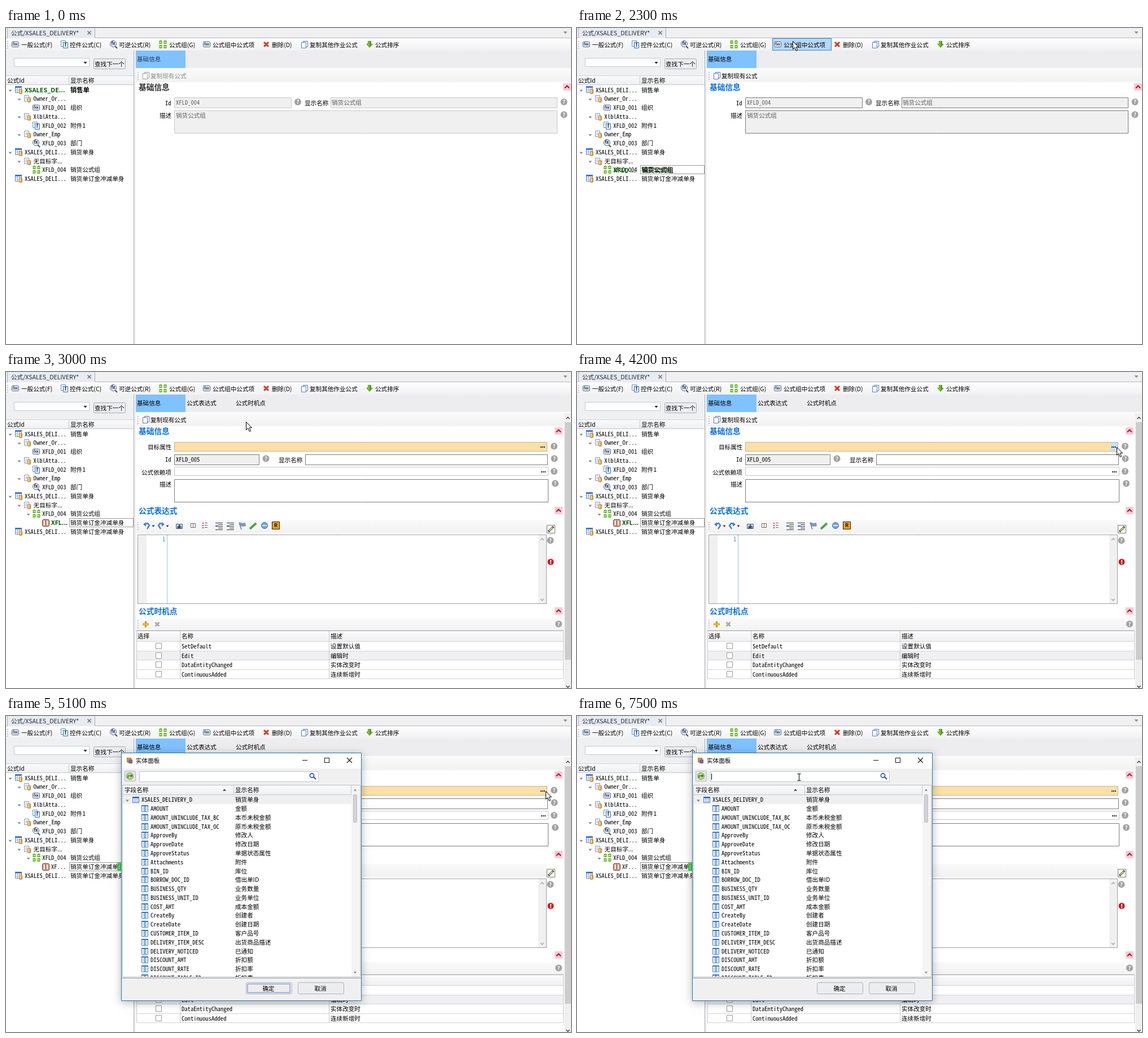
These frames come from a looping animation (1001 px wide and 560 px high, 8000 ms). An HTML page with a canvas:

```html
<!DOCTYPE html>
<html lang="zh-CN">
<head>
<meta charset="utf-8">
<title>公式</title>
<style>
html, body { margin: 0; width: 100%; height: 100%; overflow: hidden; background: #fff; }
canvas { display: block; }
</style>
</head>
<body>
<canvas id="stage" width="1001" height="560"></canvas>
<script>
const LOOP = 8000, STEP = 100;
const stage = document.getElementById('stage');
const screen2d = stage.getContext('2d');
const layer = document.createElement('canvas');
layer.width = stage.width;
layer.height = stage.height;
const layer2d = layer.getContext('2d');
let g = screen2d;

const SANS = '"Noto Sans CJK SC", "Noto Sans CJK", sans-serif';
const MONO = '"Noto Sans Mono CJK SC", "Liberation Mono", monospace';
g.font = `100px ${MONO}`;
const monoSize = 530 / g.measureText('M').width;

// Drawing helpers
function text(str, x, y, color = '#000', size = 10.6, bold = false, align = 'left') {
  g.font = `${bold ? 'bold ' : ''}${size}px ${SANS}`;
  g.textAlign = align;
  g.textBaseline = 'middle';
  g.fillStyle = color;
  g.fillText(str, x, y);
}
function mono(str, x, y, color = '#000') {
  g.font = `${monoSize}px ${MONO}`;
  g.textAlign = 'left';
  g.textBaseline = 'middle';
  g.fillStyle = color;
  g.fillText(str, x, y);
}
const label = (str, x, y, color) => /^[\x20-\x7e]+$/.test(str) ? mono(str, x, y, color) : text(str, x, y, color);
function fill(x, y, w, h, color) {
  g.fillStyle = color;
  g.fillRect(x, y, w, h);
}
function box(x, y, w, h, color, border, radius = 0) {
  g.beginPath();
  g.roundRect(x + .5, y + .5, w - 1, h - 1, radius);
  g.fillStyle = color;
  g.fill();
  g.lineWidth = 1;
  g.strokeStyle = border;
  g.stroke();
}
function trace(pts) {
  g.beginPath();
  pts.forEach(([x, y]) => g.lineTo(x, y));
}
function line(pts, color, width = 1) {
  trace(pts);
  g.strokeStyle = color;
  g.lineWidth = width;
  g.stroke();
}
function poly(pts, color) {
  trace(pts);
  g.closePath();
  g.fillStyle = color;
  g.fill();
}
function disc(x, y, r, color, border) {
  g.beginPath();
  g.arc(x, y, r, 0, 7);
  g.fillStyle = color;
  g.fill();
  if (border) {
    g.strokeStyle = border;
    g.lineWidth = 1;
    g.stroke();
  }
}
function fade(x, y, w, h, from, to) {
  const grad = g.createLinearGradient(0, y, 0, y + h);
  grad.addColorStop(0, from);
  grad.addColorStop(1, to);
  fill(x, y, w, h, grad);
}
const hline = (x, y, w, color) => fill(x, y, w, 1, color);
const vline = (x, y, h, color) => fill(x, y, 1, h, color);
const down = (x, y, r, color) => poly([[x - r, y - r / 2], [x + r, y - r / 2], [x, y + r / 2 + .5]], color);
function dotted(x, y, w, h, color = '#333') {
  g.setLineDash([1, 1]);
  g.strokeStyle = color;
  g.lineWidth = 1;
  g.strokeRect(x + .5, y + .5, w - 1, h - 1);
  g.setLineDash([]);
}
function cross(x, y, r, color, width) {
  line([[x - r, y - r], [x + r, y + r]], color, width);
  line([[x + r, y - r], [x - r, y + r]], color, width);
}
function grip(x, y) {
  for (let i = 0; i < 4; i++) fill(x, y + i * 4, 1.5, 1.5, '#a4a8ae');
}

// Icons: x is the left edge, y the vertical centre
const icons = {
  fx(x, y) {
    box(x, y - 5, 13, 10, '#eef4fc', '#44618c', 1);
    text('fxx', x + 6.5, y - .5, '#123', 6, true, 'center');
  },
  control(x, y) {
    box(x, y - 7, 9, 11, '#f4f8fd', '#6c93c0');
    hline(x + 2, y - 4, 5, '#a8bcd4');
    box(x + 4, y - 4, 9, 11, '#e6f0fc', '#3a6fb8');
    text('f', x + 8.5, y + 1, '#1c4c94', 9, true, 'center');
  },
  reverse(x, y) {
    line([[x + 9, y + 3], [x + 13, y + 7]], '#3d4d63', 2);
    disc(x + 6, y - 1, 5.5, '#e4eefa', '#50698c');
    text('fx', x + 6, y - 1.5, '#123', 7.5, true, 'center');
  },
  group(x, y) {
    for (const dx of [0, 8]) for (const dy of [-7, 1]) {
      fill(x + dx + 1, y + dy, 4, 6, '#58ac22');
      fill(x + dx, y + dy + 1, 6, 1.5, '#70c234');
      fill(x + dx, y + dy + 4, 6, 1.5, '#70c234');
      fill(x + dx + 2, y + dy + 2, 2, 2, '#d8f0b8');
    }
  },
  remove(x, y) { cross(x + 6, y, 4, '#d23a22', 3); },
  copy(x, y, gray) {
    const c = gray ? '#a0a0a0' : '#5679b6';
    box(x + 3, y - 6, 9, 11, '#fff', c);
    box(x, y - 4, 9, 11, '#fff', c);
  },
  sort(x, y) {
    poly([[x + 3, y - 6], [x + 9, y - 6], [x + 9, y - 1], [x + 12, y - 1], [x + 6, y + 6], [x, y - 1], [x + 3, y - 1]], '#4f9c1b');
    poly([[x + 4, y - 5], [x + 6, y - 5], [x + 6, y + 4], [x + 2, y], [x + 4, y]], '#8dcc3d');
  },
  table(x, y) {
    box(x, y - 7, 12, 12, '#fff', '#5a86c0');
    fill(x, y - 7, 12, 3, '#3f79c4');
    for (const d of [4, 8]) vline(x + d, y - 4, 8, '#9db8da');
    for (const d of [-2, 1]) hline(x + 1, y + d, 10, '#9db8da');
    icons.drum(x + 7, y);
  },
  drum(x, y) {
    box(x, y - 2, 6, 9, '#e6a94c', '#b8802e', 1);
    fill(x + 1, y - 1, 2, 6, '#fbd999');
  },
  entity(x, y) {
    box(x, y - 6, 9, 11, '#fafcff', '#8099b8');
    for (const d of [-3, -1, 1]) hline(x + 2, y + d, 5, '#a8bcd4');
    icons.drum(x + 6, y);
  },
  item(x, y) {
    box(x, y - 6, 13, 13, '#dcb0a0', '#6e2c20', 2);
    fill(x + 3, y - 3, 2, 7, '#f8e4dc');
    fill(x + 8, y - 3, 2, 7, '#f8e4dc');
    vline(x + 6, y - 4, 9, '#8a3c2c');
  },
  sheet(x, y) {
    box(x, y - 6, 12, 12, '#fff', '#4d7fc4');
    fill(x, y - 6, 12, 2, '#3a70ba');
    fill(x + 4, y - 4, 4, 9, '#8fb4e4');
    for (const d of [-2, 0, 2]) {
      hline(x + 1, y + d, 3, '#c4d6ee');
      hline(x + 8, y + d, 3, '#c4d6ee');
    }
  },
  grid(x, y) {
    box(x, y - 5, 12, 11, '#fff', '#4d7fc4');
    fill(x, y - 5, 12, 3, '#3a70ba');
    for (const d of [4, 8]) vline(x + d, y - 2, 7, '#8fb0dc');
    for (const d of [0, 3]) hline(x + 1, y + d, 10, '#8fb0dc');
  }
};
function help(x, y) {
  disc(x, y, 6, '#a2a2a2');
  text('?', x, y - .5, '#fff', 9.5, true, 'center');
}
function chevron(x, y, color, w = 4, width = 2) {
  line([[x - w, y + w / 2], [x, y - w / 2], [x + w, y + w / 2]], color, width);
}
function section(title, y, foldX, color = '#0a6fe0') {
  text(title, 235, y, color, 13.7, true);
  fill(foldX, y - 7, 14, 13, '#f8cbd4');
  chevron(foldX + 7, y - .5, '#b0122c');
}
function dots(x, y) {
  for (const d of [-4, -1, 2]) fill(x + d, y, 2, 2, '#222');
}

// Window chrome
const TOOLS = [
  ['fx', 10, 27, '一般公式(F)'], ['control', 97, 113, '控件公式(C)'], ['reverse', 184, 200, '可逆公式(R)'],
  ['group', 271, 289, '公式组(G)'], ['fx', 349, 366, '公式组中公式项'], ['remove', 455, 471, '删除(D)'],
  ['copy', 523, 538, '复制其他作业公式'], ['sort', 638, 654, '公式排序']
];
function chrome(hover) {
  fill(0, 0, 1001, 560, '#fff');
  fill(0, 0, 1001, 18, '#f0f0f2');
  hline(0, 17, 1001, '#b4b8be');
  fill(2, 0, 156, 18, '#e8ebf0');
  vline(2, 0, 18, '#a8aeb8');
  vline(157, 0, 18, '#a8aeb8');
  text('公式/XSALES_DELIVERY*', 9, 8.5, '#1e2a3c');
  cross(147.5, 8.5, 3, '#6a7078', 1.6);
  down(991, 8, 3.5, '#888');
  fade(0, 18, 1001, 22, '#fdfdfd', '#f1f2f4');
  grip(2, 23);
  if (hover) box(346, 18, 105, 22, '#b5d9f6', '#3b8ad0');
  for (const [icon, ix, tx, name] of TOOLS) {
    icons[icon](ix, 29);
    text(name, tx, 29.5);
  }
}

function leftPane() {
  fill(0, 40, 226, 44, '#eff0f2');
  box(14, 53, 134, 16, '#fff', '#c6c9ce');
  down(140.5, 61.5, 3, '#111');
  box(155, 54, 57, 19, '#ebedf1', '#a7abb3', 2);
  text('查找下一个', 157, 63.5);
  fade(0, 84, 226, 17, '#fbfbfc', '#eeeff1');
  hline(0, 84, 226, '#cfd2d6');
  hline(0, 100, 226, '#c4c7cc');
  vline(111, 85, 15, '#c4c7cc');
  text('公式Id', 2, 92.5);
  text('显示名称', 114, 92.5);
  fill(227, 40, 3, 520, '#f0f0f2');
  vline(226, 40, 520, '#a9adb3');
}

const TREE = [
  [0, 'table', 'XSALES_DELI...', '销售单'], [1, 'entity', 'Owner_Or...'], [2, 'fx', 'XFLD_001', '组织'],
  [1, 'entity', 'XlblAtta...'], [2, 'control', 'XFLD_002', '附件1'], [1, 'entity', 'Owner_Emp'],
  [2, 'reverse', 'XFLD_003', '部门'], [0, 'table', 'XSALES_DELI...', '销货单身'], [1, 'entity', '无目标字...'],
  [2, 'group', 'XFLD_004', '销货公式组']
];
const LAST = [0, 'table', 'XSALES_DELI...', '销货单订金冲减单身'];
const ADDED = [3, 'item', '', '销货单订金冲减单身'];

function tree(t, expanded) {
  const rows = expanded ? [...TREE, ADDED, LAST] : [...TREE, LAST];
  rows.forEach(([depth, icon, id, name], i) => {
    const y = 109.5 + i * 15.75, x = 16 + depth * 16;
    const opens = rows[i + 1] && rows[i + 1][0] > depth;
    if (opens) down(x - 8.5, y + 1.5, 3, '#888');
    icons[icon](Math.round(x - (depth === 2 ? 1 : 0)), Math.round(y));
    if (i === 0 && t < 900) {
      text('XSALES_DE...', 33, y + .5, '#005c00', 10.9, true);
      text(name, 114, y + .5, '#000', 11.3, true);
      return;
    }
    label(id, 33 + depth * 15.6, y);
    if (name) text(name, 114, y);
  });
  if (expanded) {
    if (t < 4400) text('XFL...', 80, 267, '#004f00', 10.6, true);
    else mono('XF...', 80, 267);
    dotted(112, 259, 114, 16);
  } else if (t >= 900) {
    text('XFLD ...', 65, 252, '#006400', 10.6, true);
    text('销货公式组', 115, 252, '#0a2a0a', 11.1, true);
    dotted(112, 243, 114, 16);
  }
}

function rightTop(active, tabs) {
  fill(230, 40, 771, 31, '#ededef');
  fill(230, 40, 88, 31, '#80c1ff');
  tabs.forEach((name, i) => text(name, [232, 320, 407][i], 55, active ? '#000' : '#263a50'));
  fade(230, 72, 771, 24, '#fafafa', '#f2f2f3');
  grip(233, 78);
  icons.copy(242, 84, !active);
  text('复制现有公式', 256, 84.5, active ? '#000' : '#888');
}

function groupForm(t) {
  const active = t >= 900, open = active && t < 2300;
  const border = active ? '#7c7c7c' : '#c8c8c8';
  const ink = open ? '#000' : '#606060';
  const paper = open ? '#fff' : '#f0f0f0';
  rightTop(active, ['基础信息']);
  section('基础信息', 105, 987, active ? undefined : '#333');
  mono('Id', 282, 132.5);
  box(298, 123, 208, 19, '#f0f0f0', border);
  mono('XFLD_004', 301, 132, ink);
  help(517, 131);
  text('显示名称', 529, 132.5);
  box(575, 123, 402, 19, paper, border);
  text('销货公式组', 577, 132, ink);
  help(988.5, 131);
  text('描述', 272, 155);
  box(298, 146, 679, 41, paper, border);
  text('销货公式组', 301, 154.5, ink);
  help(988.5, 153.5);
}

function editorTools() {
  fade(230, 262, 728, 23, '#fafafa', '#f2f2f3');
  grip(233, 266);
  for (const [x, s] of [[249, 1], [275, -1]]) {
    line([[x - 3 * s, 270], [x + 2 * s, 268], [x + 5 * s, 272], [x + s, 278]], '#4a7cc0', 2.4);
    poly([[x - 6 * s, 270], [x - s, 266], [x - s, 274]], '#4a7cc0');
    down(x + (s > 0 ? 12 : 11), 273, 2.5, '#222');
  }
  box(301, 269, 6, 9, '#c7d9ee', '#42628c');
  box(307, 269, 6, 9, '#c7d9ee', '#42628c');
  text('ab', 307, 274, '#123', 7, true, 'center');
  box(327, 268, 5, 8, '#fff', '#666');
  box(331, 268, 5, 8, '#fff', '#666');
  for (let i = 0; i < 3; i++) {
    fill(348, 267 + i * 4, 2, 2, '#c33');
    hline(352, 267 + i * 4, 5, '#666');
  }
  for (const x of [371, 391]) {
    for (let i = 0; i < 5; i++) hline(x + (i % 4 ? 5 : 0), 267 + i * 3, i % 4 ? 8 : 13, '#333');
    line([[x, 273], [x + 5, 273]], '#2b62b4', 2);
  }
  line([[413, 267], [417, 279]], '#777', 1.5);
  poly([[413, 266], [419, 268], [424, 267], [425, 273], [420, 274], [415, 273]], '#7c99be');
  line([[432, 278], [443, 268]], '#4aa545', 4);
  disc(458, 272, 5.5, '#72a6dc', '#3d72b0');
  line([[454, 272], [462, 272]], '#fff', 1.5);
  box(471, 265, 14, 14, '#f6a21c', '#222');
  text('R', 478, 272, '#111', 9, true, 'center');
  box(958, 271, 15, 15, '#fff', '#777');
  line([[961, 283], [970, 274]], '#444', 3.6);
  line([[962.5, 281.5], [968.5, 275.5]], '#f2d46a', 1.8);
}

const TIMINGS = [['SetDefault', '设置默认值'], ['Edit', '编辑时'], ['DataEntityChanged', '实体改变时'], ['ContinuousAdded', '连续新增时']];
function timingGrid() {
  fade(230, 436, 758, 22, '#fafafa', '#f2f2f3');
  grip(233, 440);
  line([[242, 447], [253, 447]], '#d99a1c', 3.5);
  line([[247.5, 441.5], [247.5, 452.5]], '#d99a1c', 3.5);
  line([[243, 447], [252, 447]], '#ffd75c', 1.2);
  cross(268, 447, 3.5, '#aaa', 3);
  help(979, 446.5);
  fade(231, 459, 757, 18, '#fbfbfc', '#f0f0f2');
  hline(231, 458, 757, '#9a9a9a');
  text('选择', 233, 468);
  text('名称', 311, 468);
  text('描述', 575, 468);
  TIMINGS.forEach(([id, name], i) => {
    const y = 486 + i * 16.5;
    if (i === 1) fill(231, 494, 757, 17, '#f0f0f3');
    box(265, Math.round(y - 6), 11, 11, '#fff', '#999');
    mono(id, 311, y);
    text(name, 575, y);
  });
  for (let i = 0; i < 5; i++) hline(231, Math.round(477 + i * 16.5), 757, '#d4d4d6');
  for (const x of [231, 308, 572, 987]) vline(x, 459, 85, '#c6c8cc');
}

function itemForm(t) {
  rightTop(true, ['基础信息', '公式表达式', '公式时机点']);
  section('基础信息', 105, 972);
  text('目标属性', 251, 133);
  box(298, 124, 661, 17, '#fce0a8', '#c4b490');
  if (t >= 4100 && t < 5100) fill(945, 125, 13, 15, '#c6e2fa');
  dots(951, 132);
  help(971, 131.5);
  mono('Id', 282, 155);
  box(298, 146, 151, 19, '#f0f0f0', '#7c7c7c');
  mono('XFLD_005', 301, 154.5);
  help(460.5, 153.5);
  text('显示名称', 483, 155.5);
  box(530, 146, 430, 19, '#fff', '#7c7c7c');
  help(971.5, 153.5);
  text('公式依赖项', 240, 177.5);
  box(298, 168, 663, 16, '#fff', '#c8c8c8');
  dots(952, 176);
  help(971, 176);
  text('描述', 272, 199);
  box(298, 190, 663, 41, '#fff', '#7c7c7c');
  help(973, 197.5);

  section('公式表达式', 246, 972);
  editorTools();
  box(233, 288, 725, 123, '#fff', '#a0a0a0');
  fill(234, 289, 15, 121, '#f0f0f0');
  mono('1', 277, 295.5, '#2b91af');
  g.setLineDash([1, 1]);
  line([[285.5, 289], [285.5, 410]], '#2b91af');
  g.setLineDash([]);
  fill(943, 289, 14, 121, '#f0f0f0');
  chevron(950, 296.5, '#aaa', 3, 1.5);
  line([[947, 402], [950, 405], [953, 402]], '#aaa', 1.5);
  help(964.5, 298.5);
  const blinkOff = t < 4700 && Math.floor(t / 250) % 2;
  if (!blinkOff) {
    disc(965, 336.5, 5.5, '#d8121a');
    fill(964, 333, 2, 4.5, '#fff');
    fill(964, 338.5, 2, 2, '#fff');
  }
  section('公式时机点', 424, 972);
  timingGrid();

  fill(989, 73, 12, 487, '#f0f0f0');
  fill(990, 89, 11, 421, '#cdcdcd');
  chevron(995.5, 81.5, '#444', 3, 1.5);
  line([[992.5, 556], [995.5, 559], [998.5, 556]], '#444', 1.5);
}

// Entity dialog
const FIELDS = `XSALES_DELIVERY_D 销货单身|AMOUNT 金额|AMOUNT_UNINCLUDE_TAX_BC 本币未税金额|AMOUNT_UNINCLUDE_TAX_OC 原币未税金额|ApproveBy 修改人|ApproveDate 修改日期|ApproveStatus 单据状态属性|Attachments 附件|BIN_ID 库位|BORROW_DOC_ID 借出单ID|BUSINESS_QTY 业务数量|BUSINESS_UNIT_ID 业务单位|COST_AMT 成本金额|CreateBy 创建者|CreateDate 创建日期|CUSTOMER_ITEM_ID 客户品号|DELIVERY_ITEM_DESC 出货商品描述|DELIVERY_NOTICED 已通知|DISCOUNT_AMT 折扣额|DISCOUNT_RATE 折扣率|DISCOUNT_TABLE_ID 折扣表`
  .split('|').map(row => row.split(' '));

function fieldList() {
  g.save();
  g.beginPath();
  g.rect(207, 140, 405, 322);
  g.clip();
  fill(207, 140, 405, 16, '#f0f0f1');
  FIELDS.forEach(([id, name], i) => {
    const y = 148.3 + i * 15.78, x = i ? 240 : 224;
    icons[i ? 'sheet' : 'grid'](x, Math.round(y));
    mono(id, x + 16, y);
    text(name, 406, y);
  });
  down(215, 150, 3, '#888');
  g.restore();
}

function button(name, x, focused) {
  box(x, 472, 82, 21, '#ededf0', '#adb1b8', 2);
  if (focused) {
    box(x + 2, 474, 77, 17, '#ededf0', '#86b4ea');
    dotted(x + 3, 475, 75, 15, '#888');
  }
  text(name, x + 40, 482.5, '#000', 10.6, false, 'center');
}

function dialog(t) {
  g.save();
  g.shadowColor = 'rgba(0,0,0,.28)';
  g.shadowBlur = 14;
  g.shadowOffsetY = 3;
  fill(204, 65, 426, 440, '#fff');
  g.restore();
  box(204, 65, 426, 440, '#f0f0f0', '#2777a8');
  fill(205, 66, 424, 27, '#fff');
  box(214, 74, 8, 8, '#e8a33a', '#8c6a30');
  box(217, 77, 7, 7, '#4b7cc8', '#c03c30');
  text('实体面板', 230, 79);
  line([[525, 78.5], [534, 78.5]], '#111');
  g.strokeRect(564.5, 74.5, 8, 8);
  cross(608.5, 78.5, 4.5, '#111', 1.1);

  box(210, 97, 20, 19, '#e2e5ea', '#b6bac0', 1);
  disc(219.5, 106.5, 6, '#b4d68c', '#6c9a3c');
  line([[216, 110], [216, 106], [222, 106]], '#4c7c1c', 1.6);
  poly([[221, 103], [225, 106], [221, 109]], '#4c7c1c');
  box(236, 98, 318, 19, '#fff', '#c2c6cc');
  line([[545, 108], [549, 112]], '#1d4fae', 2.2);
  g.lineWidth = 1.6;
  g.beginPath();
  g.arc(542, 105.5, 3.6, 0, 7);
  g.stroke();

  box(206, 122, 422, 341, '#fff', '#b8bcc2');
  fade(207, 123, 405, 16, '#fbfbfc', '#eff0f2');
  hline(207, 139, 405, '#c4c7cc');
  vline(403, 123, 16, '#c4c7cc');
  vline(611, 123, 16, '#c4c7cc');
  text('字段名称', 210, 131);
  poly([[384, 132.5], [390, 132.5], [387, 129.5]], '#222');
  text('显示名称', 406, 131);
  fieldList();
  fill(612, 123, 14, 339, '#f4f4f5');
  box(615, 139, 7, 50, '#d2d4d8', '#b9bbc0', 1);
  poly([[616, 132.5], [621, 132.5], [618.5, 129.5]], '#777');
  down(618.5, 454.5, 2.5, '#777');
  hline(205, 464, 424, '#9a9da2');
  button('确定', 425, t < 6500);
  button('取消', 517, false);
  if (t >= 6500 && Math.floor(t / 500) % 2) vline(238, 102, 11, '#000');
}

function openDialog(t) {
  const p = Math.min(1, (t - 4800) / 300);
  const alpha = [.48, .85, 1][Math.round(p * 3) - 1];
  const scale = 1 - .045 * (1 - p);
  layer2d.clearRect(0, 0, 1001, 560);
  g = layer2d;
  dialog(t);
  g = screen2d;
  g.save();
  g.globalAlpha = alpha;
  g.translate(416.5, 285);
  g.scale(scale, scale);
  g.drawImage(layer, -416.5, -285);
  g.restore();
}

// Pointer: time, x, y
const PATH = [
  [200, 986, 44], [300, 760, 120], [400, 330, 232], [500, 81, 265], [600, 119, 246], [1000, 119, 246],
  [1300, 251, 105], [1900, 379, 24], [2000, 382, 23], [2300, 382, 23], [3000, 425, 88], [3100, 405, 110],
  [4000, 930, 140], [4100, 956, 133], [5200, 956, 133], [5700, 500, 112], [6300, 393, 108], [LOOP, 393, 108]
];
function pointerAt(t) {
  if (t < PATH[0][0]) return [-50, -50];
  const i = PATH.findIndex(k => k[0] > t);
  const [t0, x0, y0] = PATH[i - 1], [t1, x1, y1] = PATH[i];
  const p = (t - t0) / (t1 - t0);
  return [Math.round(x0 + (x1 - x0) * p), Math.round(y0 + (y1 - y0) * p)];
}
const ARROW = [[0, 0], [0, 14], [3.2, 11], [5.8, 17], [8.2, 16], [5.6, 10.2], [10, 10.2], [0, 0]];
function pointer(x, y, beam) {
  if (beam) {
    line([[x + .5, y - 5], [x + .5, y + 6]], '#000');
    line([[x - 2.5, y - 5.5], [x + 3.5, y - 5.5]], '#000');
    line([[x - 2.5, y + 6.5], [x + 3.5, y + 6.5]], '#000');
    return;
  }
  const pts = ARROW.map(([dx, dy]) => [x + dx + .5, y + dy + .5]);
  poly(pts, '#fff');
  line(pts, '#000');
}

function draw(t) {
  const [x, y] = pointerAt(t);
  const expanded = t >= 2600;
  chrome(x > 346 && x < 451 && y > 17 && y < 39);
  leftPane();
  tree(t, expanded);
  if (expanded) itemForm(t);
  else groupForm(t);
  if (t >= 4900) {
    if (t < 5100) fill(209, 260, 17, 15, '#4be84b');
    else {
      fill(197, 260, 7, 15, '#62e562');
      dotted(198, 262, 5, 11, '#0a7a0a');
    }
    openDialog(t);
  }
  pointer(x, y, t >= 5700 && x < 553 && y < 117);
}

function tick() {
  const t = performance.now() % LOOP;
  draw(Math.floor(t / STEP) * STEP);
  requestAnimationFrame(tick);
}
tick();
</script>
</body>
</html>
```
